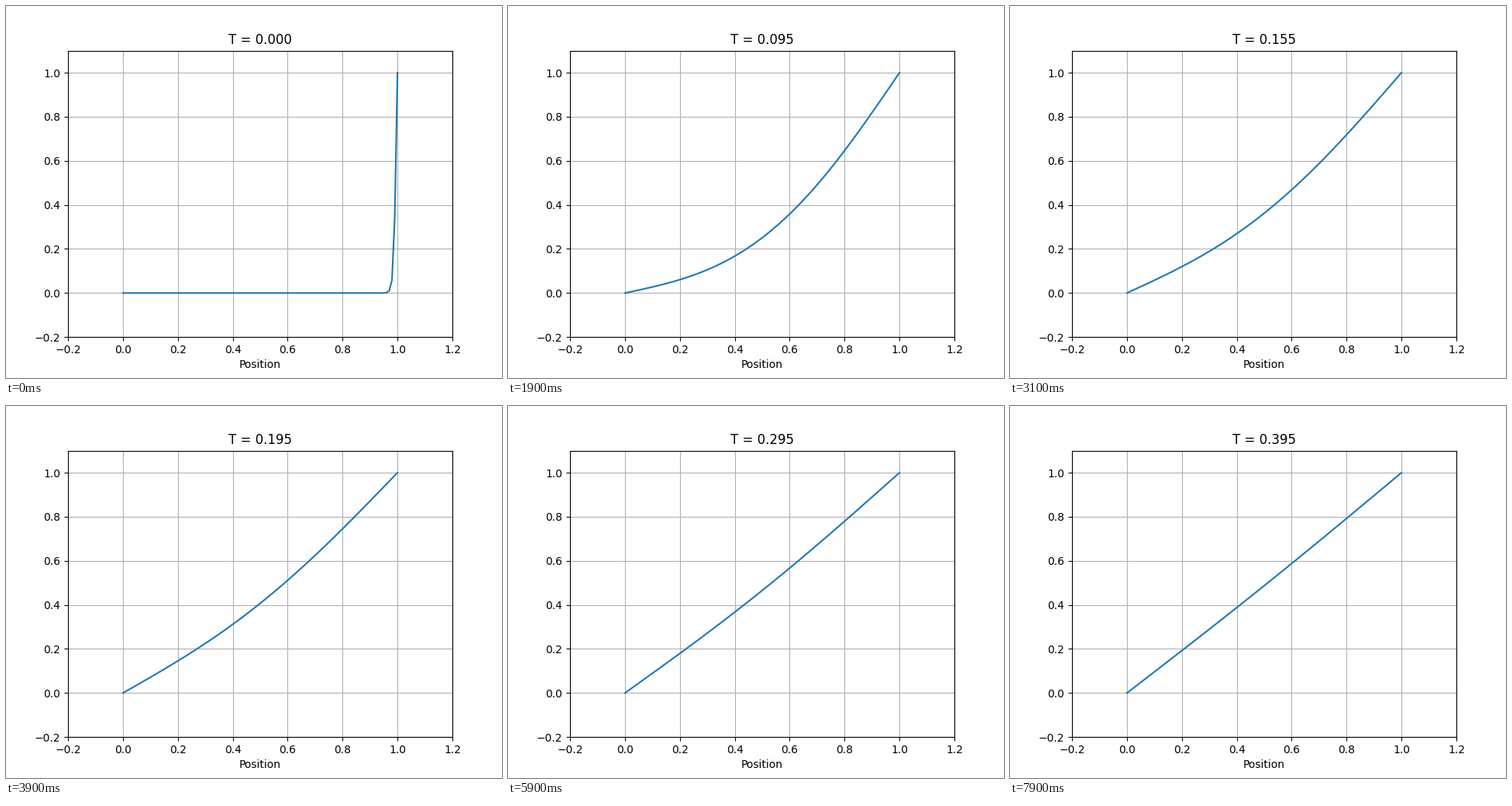
Recreate the animation shown at these times as a matplotlib script. Size 640x480 px, loop 8 s.

```python
import numpy as np
import matplotlib.pyplot as plt
from matplotlib.animation import FuncAnimation

# Heat flow along a rod, ends held at 0 and 1, Crank-Nicolson scheme
N = 101
DX = 1 / (N - 1)
DT = 5e-5
STEPS = 100
FRAMES = 80

x = np.linspace(0, 1, N)


def step_matrix():
    lap = np.zeros((N, N))
    i = np.arange(1, N - 1)
    lap[i, i - 1] = lap[i, i + 1] = 1
    lap[i, i] = -2
    half = DT / DX**2 / 2 * lap
    eye = np.eye(N)
    return np.linalg.solve(eye - half, eye + half)


def solve():
    step = step_matrix()
    leap = np.linalg.matrix_power(step, STEPS)
    u = np.zeros(N)
    u[-1] = 1
    states = [step @ u]
    while len(states) < FRAMES:
        states.append(leap @ states[-1])
    return states


states = solve()

fig, ax = plt.subplots(figsize=(6.4, 4.8), dpi=100)
line, = ax.plot(x, states[0], color="#1f77b4", lw=1.5)
title = ax.set_title("T = 0.000")
ax.set_xlabel("Position")
ax.set_xlim(-0.2, 1.2)
ax.set_ylim(-0.2, 1.1)
ax.grid(True)


def update(k):
    line.set_ydata(states[k])
    title.set_text(f"T = {k * STEPS * DT:.3f}")
    return line, title


anim = FuncAnimation(fig, update, frames=FRAMES, interval=100,
                     repeat=True, repeat_delay=0, blit=False)
plt.show()
```
